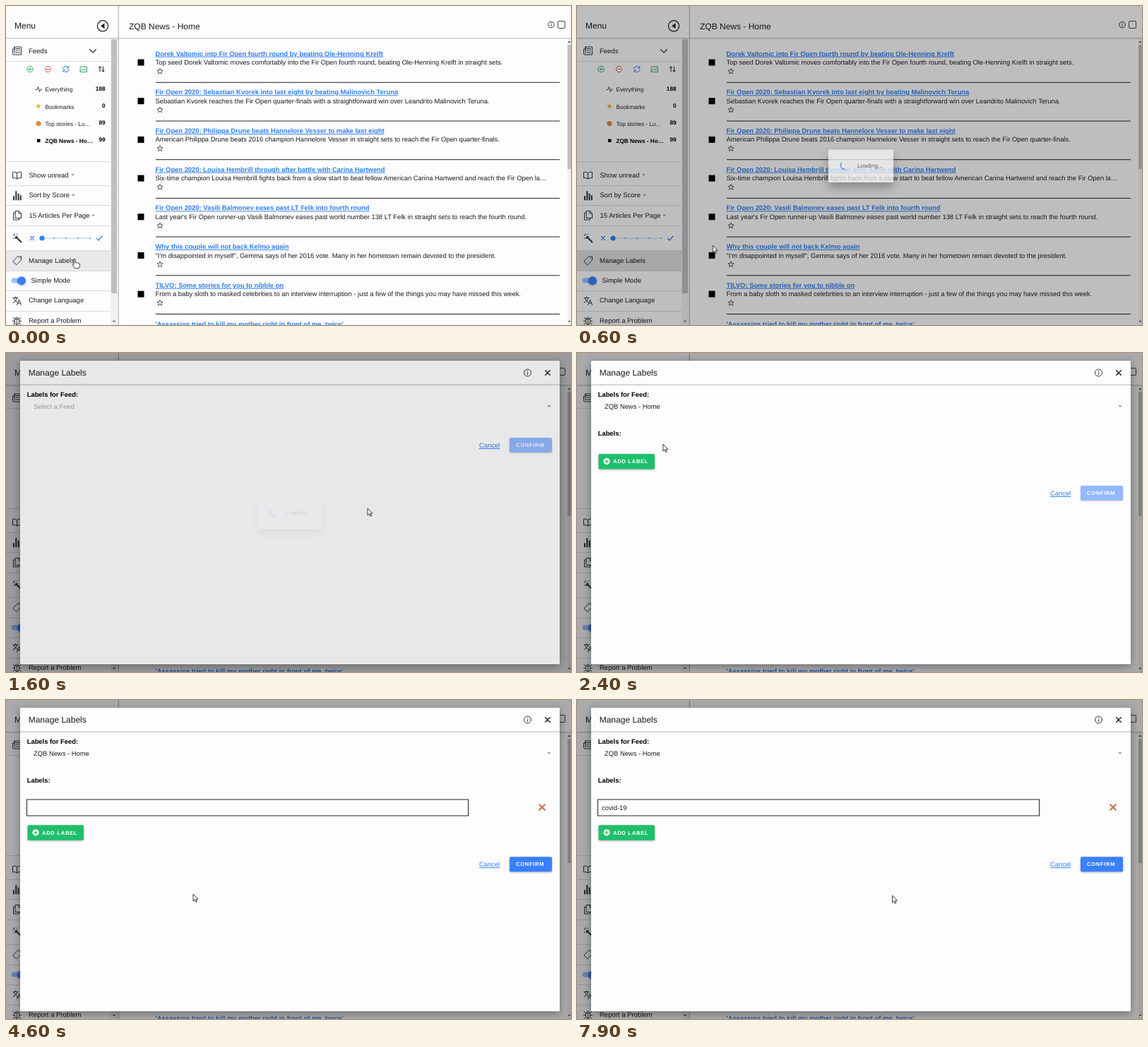
These frames come from a looping animation (800 by 452 pixels, 8000 ms). An HTML page:

```html
<!DOCTYPE html>
<html lang="en">
<head>
<meta charset="utf-8">
<title>Manage Labels</title>
<style>
  html, body { margin: 0; width: 100%; height: 100%; overflow: hidden; background: #fdfcfe; }
  svg { display: block; width: 800px; height: 452px; }
  text { font-family: "Liberation Sans", Arial, sans-serif; font-size: 9.5px; fill: #1c1c1e; text-rendering: geometricPrecision; white-space: pre; }
  .h { font-size: 12px; }
  .s { font-size: 8.2px; }
  .a { font-size: 9.38px; }
  .b { font-weight: bold; fill: #000; }
  .link { fill: #2f80ee; text-decoration: underline; }
  .btn { font-size: 7.6px; font-weight: bold; letter-spacing: .7px; fill: #fff; }
  .i { fill: none; stroke: #333; stroke-width: 1; stroke-linecap: round; stroke-linejoin: round; }
  .rule { stroke: #d9d9db; }
  .lift { filter: drop-shadow(0 1px 1.5px rgba(0,0,0,.3)); }
  #sheet { filter: drop-shadow(0 3px 6px rgba(0,0,0,.35)); }
  #box { filter: drop-shadow(0 7px 6px rgba(0,0,0,.38)); }
</style>
</head>
<body>
<svg id="stage" viewBox="0 0 800 452" xmlns="http://www.w3.org/2000/svg"></svg>
<script>
const LOOP = 8000;
const text = (x, y, s, cls = '', extra = '') => `<text x="${x}" y="${y}" class="${cls}" ${extra}>${s}</text>`;
const icon = (d, color = '#333', w = 1) => `<path class="i" d="${d}" style="stroke:${color};stroke-width:${w}"/>`;
const rect = (x, y, w, h, fill, extra = '') => `<rect x="${x}" y="${y}" width="${w}" height="${h}" fill="${fill}" ${extra}/>`;
const disc = (x, y, r, fill, extra = '') => `<circle cx="${x}" cy="${y}" r="${r}" fill="${fill}" ${extra}/>`;
const ring = (x, y, r, color, w = 1) => disc(x, y, r, 'none', `stroke="${color}" stroke-width="${w}"`);
const line = (x1, y1, x2, y2, extra) => `<line x1="${x1}" y1="${y1}" x2="${x2}" y2="${y2}" ${extra}/>`;
const drop = (x, y, r = 2.6, color = '#999') => `<path d="M${x - r} ${y - r / 2}h${2 * r}l${-r} ${r}z" fill="${color}"/>`;
const star = (x, y, r, style) => {
  const p = Array.from({ length: 10 }, (_, k) => {
    const q = k % 2 ? r * .42 : r, a = k * Math.PI / 5;
    return `${(x + q * Math.sin(a)).toFixed(2)},${(y - q * Math.cos(a)).toFixed(2)}`;
  });
  return `<polygon points="${p.join(' ')}" ${style}/>`;
};
const info = (x, y, r) => ring(x, y, r, '#333') +
  line(x, y - .6, x, y + r * .55, 'stroke="#333" stroke-width="1.1"') + disc(x, y - r * .48, .7, '#333');

const articles = [
  ['Dorek Valtomic into Fir Open fourth round by beating Ole-Henning Krelft',
   'Top seed Dorek Valtomic moves comfortably into the Fir Open fourth round, beating Ole-Henning Krelft in straight sets.'],
  ['Fir Open 2020: Sebastian Kvorek into last eight by beating Malinovich Teruna',
   'Sebastian Kvorek reaches the Fir Open quarter-finals with a straightforward win over Leandrito Malinovich Teruna.'],
  ['Fir Open 2020: Philippa Drune beats Hannelore Vesser to make last eight',
   'American Philippa Drune beats 2016 champion Hannelore Vesser in straight sets to reach the Fir Open quarter-finals.'],
  ['Fir Open 2020: Louisa Hembrill through after battle with Carina Hartwend',
   'Six-time champion Louisa Hembrill fights back from a slow start to beat fellow American Carina Hartwend and reach the Fir Open la…'],
  ['Fir Open 2020: Vasili Balmonev eases past LT Felk into fourth round',
   "Last year's Fir Open runner-up Vasili Balmonev eases past world number 138 LT Felk in straight sets to reach the fourth round."],
  ['Why this couple will not back Kelmo again',
   '"I\'m disappointed in myself", Gemma says of her 2016 vote. Many in her hometown remain devoted to the president.'],
  ['TILVO: Some stories for you to nibble on',
   'From a baby sloth to masked celebrities to an interview interruption - just a few of the things you may have missed this week.'],
  ["'Assassins tried to kill my mother right in front of me, twice'", '']
];

function articleList() {
  return articles.map(([title, body], k) => {
    const y = 54.7 * k;
    return text(211.5, 70.6 + y, title, 'a b link', 'style="fill:#2f80ee"') + text(211.5, 83 + y, body, 'a') +
      rect(186.5, 75.5 + y, 9, 9, '#000') +
      star(218, 92.6 + y, 4.3, 'fill="none" stroke="#333" stroke-width=".8"') +
      line(212, 108.3 + y, 784, 108.3 + y, 'stroke="#222"');
  }).join('');
}

function feedRow(k, name, count, cls) {
  const y = 121.3 + 24.2 * k;
  return text(55.5, y, name, 's ' + cls) + text(140.5, y - 1.8, count, 's b', 'text-anchor="end"');
}

function sidebar() {
  const rules = [78, 220, 254, 282, 311, 346, 375, 403, 432];
  const dots = [68, 85, 102, 119].map(x => disc(x, 329, 1, '#5c9df0')).join('');
  return rect(0, 346, 148, 29, '#000', 'id="row"') +
    rules.map(y => line(0, y + .5, 148, y + .5, 'class="rule"')).join('') +
    icon('M12 58h9.500v11h-10.500q-1.500 0-1.500-1.500v-6.500h2.500zM12 58v9M14 60.500h5.500M14 63h2.500M18 63h1.500M14 66h5.500') +
    text(32, 66.8, 'Feeds') + icon('M118.500 61.500l4.500 4.500l4.500-4.500', '#333', 1.2) +
    ring(34, 89.500, 4.2, '#2fae6a') + icon('M32 89.500h4M34 87.500v4', '#2fae6a') +
    ring(59.500, 89.500, 4.2, '#c5694d') + icon('M57.500 89.500h4', '#c5694d') +
    icon('M80.500 89a4.300 4.300 0 0 1 8-1.500M89.300 90a4.300 4.300 0 0 1-8 1.500M88.700 85.500v2.500h-2.500M81 93.500v-2.500h2.500', '#2f80ee') +
    icon('M105.500 86h9v7.500h-9zM106 92l3-3l2 2l1.500-1.500l2 2M112 88h.5', '#2fae6a') +
    icon('M133 86v7M131.200 87.800l1.800-2l1.800 2M137.500 86v7M135.700 91.200l1.800 2l1.800-2', '#222') +
    icon('M42 118.500h2l1.500-4l2 7l1.500-3.500h1.500', '#444') + star(46, 142, 4.2, 'fill="#f8b32c"') +
    disc(46, 166.500, 3.6, '#e08a3c') + rect(44, 188.500, 4.5, 4.5, '#000') +
    feedRow(0, 'Everything', '188', '') + feedRow(1, 'Bookmarks', '0', '') +
    feedRow(2, 'Top stories - Lu…', '89', '') + feedRow(3, 'ZQB News - Ho…', '99', 'b') +
    icon('M15.500 236.500q-3-2-6-1.200v8.500q3-.8 6 1q3-1.800 6-1v-8.500q-3-.8-6 1.200v8.300') + text(32.500, 242.500, 'Show unread') + drop(94.500, 239.500) +
    icon('M11 270v4.500M14.300 263v11.500M17.600 266.500v8M20.800 269v5.500', '#333', 2) + text(32.500, 271.300, 'Sort by Score') + drop(95.500, 268.300) +
    icon('M13.500 290.500h5l3 3v7h-8zM18 290.500v3.500h3.500M13 293h-2.500v10h8v-2') + text(32.500, 300, '15 Articles Per Page') + drop(123.500, 297) +
    icon('M14 327l7.500 7.500M13.500 329l2-2', '#333', 2) + icon('M12 322.500v1.500M10 325h1.500M16 323l-1 1M10.500 329.500l1-1') +
    icon('M34.500 326.500l5 5M39.500 326.500l-5 5', '#2f80ee', 1.2) + line(51, 329, 119, 329, 'stroke="#a9cdf8"') + dots +
    disc(51, 329, 3.6, '#2f80ee') + icon('M128.500 329.500l2.500 2.500l5-6', '#2f80ee', 1.2) +
    icon('M10 361.500l6.500-6.500h5v5l-6.500 6.500zM19.500 357h.2') + text(32, 363.500, 'Manage Labels') +
    rect(7.500, 385.500, 20, 7, '#9cc2f8', 'rx="3.5"') + disc(22, 389.300, 6, '#3880ff', 'class="lift"') + text(35.500, 392, 'Simple Mode') +
    icon('M10 413.500h7M13.500 412v1.500M11 414q2 4.500 5 6M16 414q-1.500 4.500-6 6.500M15.500 423.500l3-7.500l3 7.500M16.500 421h4') + text(32, 420.300, 'Change Language') +
    icon('M12.500 443.500h6v5a3 3 0 0 1-6 0zM13.500 443a2 2 0 0 1 4 0M10 441.500l2.500 2M21 441.500l-2.500 2M9.500 446.500h3M18.500 446.500h3M10 451l2.500-2M21 451l-2.500-2M15.500 444v7') +
    text(32, 448.500, 'Report a Problem') +
    rect(148, 46, 10, 406, '#f0f0f1') + rect(149, 46, 8, 361, '#bfbfc1') + drop(153, 447, 2.2, '#444');
}

function page() {
  return rect(0, 0, 800, 452, '#fdfcfe') + sidebar() + articleList() +
    rect(795, 46, 5, 406, '#f0f0f1') + rect(795, 55, 5, 176, '#bfbfc1') +
    drop(797.500, 447, 2, '#444') + '<path d="M795.500 52h4l-2-2.500z" fill="#444"/>' +
    rect(0, 0, 800, 45, '#fdfcfe') + rect(0, 45, 800, 1.2, '#c4c4c6') + rect(0, 46.200, 800, 1.2, '#ebebed') +
    rect(158.700, 0, 1.3, 452, '#bcbcbe') +
    text(12, 32.300, 'Menu', 'h') + ring(137, 28.300, 7.6, '#222', 1.3) + '<path d="M139.500 24.300v8l-5.500-4z" fill="#222"/>' +
    text(174, 32.700, 'ZQB News - Home', 'h') + info(772, 26.500, 4.3) +
    rect(781.500, 21.500, 10, 10, 'none', 'rx="1.5" stroke="#444"');
}

function modal() {
  return rect(20, 11, 764, 430, '#fdfcfe', 'rx="1"') +
    rect(20, 44.300, 764, 1.2, '#bdbdbf') + rect(20, 45.500, 764, 1.2, '#ececee') +
    text(31.700, 32, 'Manage Labels', 'h') + info(738.500, 28, 5) +
    icon('M763.700 24.700l6.600 6.600M770.300 24.700l-6.600 6.600', '#222', 1.5) +
    text(29.700, 62, 'Labels for Feed:', 'a b') + text(39, 79, '', 'a', 'id="feed"') + drop(769, 75.700, 2.8) +
    `<g id="labels">${text(29.700, 117, 'Labels:', 'a b')}
      <g id="add">${rect(30.500, 143, 79.500, 21.500, '#20bf6b', 'rx="2" class="lift"')}${disc(42, 153.600, 4.6, '#fff')}
        ${icon('M39.800 153.600h4.400M42 151.400v4.400', '#20bf6b', 1.2)}${text(51, 156.400, 'ADD LABEL', 'btn')}</g></g>
    <g id="entry">${rect(29.500, 141, 625, 23, '#fff', 'stroke="#222"')}${text(35, 155.500, '', 'a', 'id="typed"')}
      ${rect(0, 147, 1, 11, '#111', 'id="caret"')}${icon('M755.200 148.200l7.600 7.600M762.800 148.200l-7.600 7.600', '#c9774f', 2.2)}</g>
    <g id="foot">${text(670, 134, 'Cancel', 'a link')}
      <g id="confirm">${rect(713, 120, 60, 21, '#3880ff', 'rx="2" class="lift"')}${text(722, 133.300, 'CONFIRM', 'btn')}</g></g>`;
}

const stage = document.getElementById('stage');
stage.innerHTML = page() + rect(0, 0, 800, 452, '#000', 'id="dim"') + `<g id="sheet">${modal()}</g>` +
  rect(0, 0, 800, 452, '#000', 'id="veil"') +
  `<g id="box">${rect(357, 204, 90, 45.500, '#f3f3f4', 'rx="1"')}
    <path id="spin" class="i" d="M380 219.500a6 6 0 0 1 5.200 9" style="stroke:#3880ff;stroke-width:1.300"/>
    ${text(397, 229.200, 'Loading...', '', 'style="font-size:8px;fill:#444"')}</g>
  <g id="cursor">
    <path id="arrow" d="M0 0v10l2.300-2.100l1.500 3.400l1.600-.7l-1.500-3.300h3.100z" fill="#fff" stroke="#222" stroke-width=".9"/>
    <path id="hand" d="M-1 0q1.200-1 2 0v4.500q2-.8 2.200.5q1.800-.6 2.100.5q1.900-.3 2 1v3q0 1.500-1.300 3h-5.500q-2-2.500-3.200-5q.4-1.500 1.700-.3z" fill="#fff" stroke="#222" stroke-width=".9"/>
  </g>`;

const el = {};
stage.querySelectorAll('[id]').forEach(n => el[n.id] = n);

// Each step: time, then the values reached at that time.
const track = {
  dim:    [[1090, 0], [1450, .33]],
  veil:   [[300, 0], [700, .33], [1300, .33], [1700, 0]],
  load:   [[300, 0], [700, 1], [1250, 1], [1650, 0]],
  zoom:   [[300, 1.1], [700, 1]],
  sheet:  [[1090, 0], [1450, 1]],
  rise:   [[1050, 24], [1100, 20], [1250, 6], [1450, 0]],
  row:    [[0, .08], [100, .09], [350, .21], [450, .21], [800, 0]],
  cursor: [[0, 97, 359], [500, 97, 359], [800, 380, 300], [1050, 525, 240], [1200, 525, 240], [1500, 512, 220],
           [1700, 512, 220], [2100, 250, 150], [2400, 122, 129], [2700, 76, 151], [3300, 76, 151],
           [3700, 150, 152], [4000, 150, 152], [4400, 265, 275], [7450, 265, 275], [7900, 446, 277], [8000, 500, 274]]
};

function at(steps, t) {
  const n = steps.findIndex(s => s[0] > t);
  if (n === 0) return steps[0].slice(1);
  if (n < 0) return steps[steps.length - 1].slice(1);
  const a = steps[n - 1], b = steps[n], k = (t - a[0]) / (b[0] - a[0]);
  return a.slice(1).map((v, j) => v + (b[j + 1] - v) * k);
}

const LABEL = 'covid-19';
const keys = [4750, 4900, 5050, 5200, 5350, 5600, 5850, 6150];
const FOCUS = 4000, FILLED = 1900, ADDED = 3000;
const show = (node, on) => node.setAttribute('visibility', on ? 'inherit' : 'hidden');
const move = (node, x, y) => node.setAttribute('transform', `translate(${x} ${y})`);

function draw(t) {
  const val = name => at(track[name], t)[0];
  const filled = t >= FILLED, added = t >= ADDED;

  el.row.setAttribute('opacity', val('row'));
  el.dim.setAttribute('opacity', val('dim'));
  el.veil.setAttribute('opacity', val('veil'));
  el.box.setAttribute('opacity', val('load'));
  el.box.setAttribute('transform', `translate(402 226.700) scale(${val('zoom')}) translate(-402 -226.700)`);
  el.spin.setAttribute('transform', `rotate(${(t - 1100) * .36} 380 225.500)`);
  el.sheet.setAttribute('opacity', val('sheet'));
  move(el.sheet, 0, val('rise'));

  el.feed.textContent = filled ? 'ZQB News - Home' : 'Select a Feed';
  el.feed.style.fill = filled ? '#1c1c1e' : '#a3a3a5';
  show(el.labels, filled);
  show(el.entry, added);
  move(el.add, 0, added ? 34.2 : 0);
  move(el.foot, 0, added ? 102.2 : filled ? 68 : 0);
  el.confirm.setAttribute('opacity', added ? 1 : .54);

  const count = keys.filter(k => k <= t).length;
  const last = count ? keys[count - 1] : FOCUS;
  el.typed.textContent = LABEL.slice(0, count);
  show(el.caret, t >= FOCUS && (t - last) % 1000 < 500);
  el.caret.setAttribute('x', 35 + (count ? el.typed.getComputedTextLength() : 0));

  const [x, y] = at(track.cursor, t);
  const hand = t < 250 || (t > 2650 && t < ADDED);
  move(el.cursor, x, y);
  show(el.hand, hand);
  show(el.arrow, !hand);
}

const start = performance.now();
function tick() {
  draw((performance.now() - start) % LOOP);
  requestAnimationFrame(tick);
}
tick();
</script>
</body>
</html>
```
